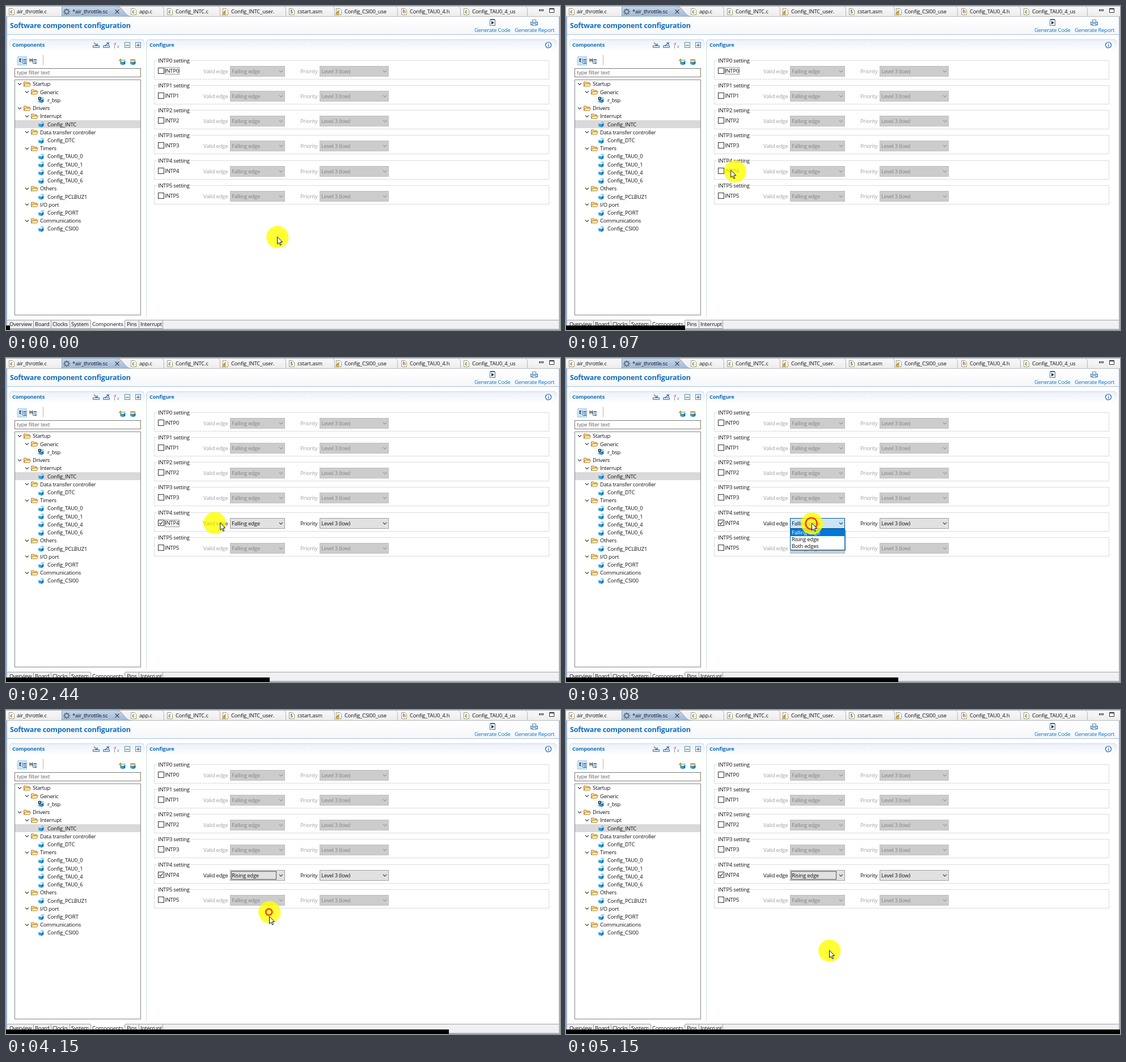
Recreate the animation shown at these times as an HTML page with a canvas. Size 977 px wide and 573 px high, loop 5200 ms.

```html
<!DOCTYPE html>
<html lang="en">
<head>
<meta charset="utf-8">
<title>Interrupt configuration</title>
<style>
html, body { margin: 0; width: 100%; height: 100%; overflow: hidden; background: #fff; }
canvas { display: block; }
</style>
</head>
<body>
<canvas id="stage" width="977" height="573"></canvas>
<script>
const ctx = document.getElementById('stage').getContext('2d');
const LOOP = 5200, FRAMES = 130;
const BLUE = '#0f6fc0', INK = '#111', FRAME = '#99b4d1';

// ---------- drawing helpers ----------
function box(x, y, w, h, fill, stroke) {
  if (fill) { ctx.fillStyle = fill; ctx.fillRect(x, y, w, h); }
  if (stroke) {
    ctx.strokeStyle = stroke;
    ctx.lineWidth = 1;
    ctx.strokeRect(x + .5, y + .5, w - 1, h - 1);
  }
}
function poly(points, fill, stroke, width = 1) {
  ctx.beginPath();
  for (let i = 0; i < points.length; i += 2) ctx.lineTo(points[i], points[i + 1]);
  if (fill) { ctx.closePath(); ctx.fillStyle = fill; ctx.fill(); }
  if (stroke) { ctx.strokeStyle = stroke; ctx.lineWidth = width; ctx.stroke(); }
}
function disc(x, y, r, fill, stroke, width = 1) {
  ctx.beginPath();
  ctx.arc(x, y, r, 0, 7);
  if (fill) { ctx.fillStyle = fill; ctx.fill(); }
  if (stroke) { ctx.strokeStyle = stroke; ctx.lineWidth = width; ctx.stroke(); }
}
// y is the vertical middle of the line of text
function text(s, x, y, color = INK, size = 9.5, weight = 400) {
  ctx.font = `${weight} ${size}px "Open Sans", "Noto Sans", sans-serif`;
  ctx.letterSpacing = '-0.22px';
  ctx.fillStyle = color;
  ctx.fillText(s, x, y + size * .36);
}
function fade(y0, y1, c0, c1) {
  const g = ctx.createLinearGradient(0, y0, 0, y1);
  g.addColorStop(0, c0);
  g.addColorStop(1, c1);
  return g;
}
const chevron = (x, y, color, r = 3) => poly([x - r, y - r / 2, x, y + r / 2, x + r, y - r / 2], null, color, 1.1);

// ---------- icons ----------
function fileIcon(x, letter, warn) {
  poly([x + .5, 4.5, x + 6.5, 4.5, x + 9.5, 7.5, x + 9.5, 15.5, x + .5, 15.5, x + .5, 4.5], '#fff', '#b59a55');
  text(letter, x + 2.5, 10.5, letter === 'h' ? '#7a4fa0' : '#2467ad', 8, 700);
  if (warn) poly([x - 1, 16, x + 2, 10, x + 5, 16], '#f3b52b', '#a9741c', .6);
}
function folder(x, y) {
  poly([x + .5, y + 4, x + .5, y - 4, x + 5, y - 4, x + 6, y - 2.5, x + 10.5, y - 2.5, x + 10.5, y], '#f5d58b', '#b78432');
  poly([x + .5, y + 4, x + 3, y - .5, x + 12.5, y - .5, x + 10.5, y + 4, x + .5, y + 4], '#fde9ae', '#b78432');
}
function cube(x, y) {
  poly([x + 3, y - 2.5, x + 7, y - 5, x + 11, y - 4, x + 7.5, y - 1.5], '#8fd0f2');
  poly([x, y - 1, x + 6, y, x + 6, y + 5.5, x + .5, y + 4], '#2f9fdd');
  poly([x + 6, y, x + 9.5, y - 2, x + 9.5, y + 3, x + 6, y + 5.5], '#1878b8');
}
function treeIcon(x, letter) {
  text(letter, x, 96, '#333', 8, 700);
  poly([x + 6.5, 93, x + 6.5, 101.5, x + 10, 101.5], null, '#4a74a5');
  box(x + 8, 94, 5, 2, '#3a78b5');
  box(x + 8, 97, 5, 2, '#d59a32');
  box(x + 9, 100, 4, 2, '#3a78b5');
}
function tray(x, out) {
  poly([x - 5.5, 70, x - 5.5, 73.5, x + 5.5, 73.5, x + 5.5, 70], '#dfeaf5', '#44719f');
  const a = out ? [x - 3, 71, x + 4, 65, x, 65, x + 4, 65, x + 4, 69] : [x - 4, 65, x + 2, 70, x + 2, 66, x + 2, 70, x - 2, 70];
  poly(a, null, '#2e6fae', 1.2);
}
function foldBox(x, plus) {
  box(x - 5, 64, 10, 10, '#f5fafe', '#5c88b4');
  box(x - 3, 69, 6, 1, '#1f5b98');
  if (plus) box(x - .5, 66, 1, 6, '#1f5b98');
}

// ---------- window parts ----------
const tabs = [
  [5, 'air_throttle.c', 'c'], [102, '*air_throttle.sc', ''], [220, 'app.c', 'c'],
  [284, 'Config_INTC.c', 'c'], [382, 'Config_INTC_user.', 'c', 1], [499, 'cstart.asm', 'S'],
  [582, 'Config_CSI00_use', 'c', 1], [697, 'Config_TAU0_4.h', 'h'], [807, 'Config_TAU0_4_us', 'c']
];
function drawTabs() {
  box(0, 0, 977, 19, fade(0, 19, '#f8f8f8', '#ededed'));
  box(0, 0, 977, 1, '#a8adb3');
  box(0, 18, 977, 1, '#b4b9c0');
  for (const x of [278, 377, 493, 579, 690, 801, 919])
    poly([x - 3, .5, x - .5, 3, x + .5, 6, x + .5, 18], null, '#b4b9c0');
  ctx.beginPath();
  ctx.moveTo(98.5, 19);
  ctx.lineTo(98.5, 3);
  ctx.quadraticCurveTo(98.5, .5, 101, .5);
  ctx.lineTo(194, .5);
  ctx.bezierCurveTo(207, .5, 208, 18, 222, 19);
  ctx.fillStyle = fade(0, 19, '#c8d7e8', '#9fb9d6');
  ctx.fill();
  ctx.strokeStyle = '#8ea5be';
  ctx.stroke();
  for (const [x, name, letter, warn] of tabs) {
    if (letter) fileIcon(x, letter, warn);
    text(name, x + (x === 5 ? 14 : 15), 10);
  }
  disc(107, 10, 3.6, null, '#68727c', 2);
  for (let i = 0; i < 8; i++) {
    const c = Math.cos(i * Math.PI / 4), s = Math.sin(i * Math.PI / 4);
    poly([107 + 4 * c, 10 + 4 * s, 107 + 6 * c, 10 + 6 * s], null, '#68727c', 1.5);
  }
  poly([192.5, 6.5, 199.5, 13.5], null, '#444', 1.2);
  poly([199.5, 6.5, 192.5, 13.5], null, '#444', 1.2);
  box(940, 6, 8, 3, '#fff', '#333');
  box(958, 4, 9, 8, '#fff', '#333');
  box(958, 4, 9, 2, '#333');
}
function drawHeader() {
  box(0, 19, 977, 32, fade(19, 51, '#fff', '#f5f7fa'));
  box(2, 50, 973, 1, '#a9c3e0');
  text('Software component configuration', 7, 34.5, BLUE, 12.6, 700);
  text('Generate Code', 826, 42.5, BLUE);
  text('Generate Report', 897, 42.5, BLUE);
  box(853, 24, 10, 11, '#f2f6fa', '#587ca0');
  box(854, 23, 8, 2, '#43698f');
  poly([856, 26.5, 861, 29.5, 856, 32.5], '#333');
  box(928, 24, 7, 5, '#fff', '#5d87b3');
  box(925, 28, 13, 6, '#bed4ea', '#4d7bab');
  box(928, 31, 7, 4, '#fff', '#5d87b3');
}
function section(x, w, title) {
  ctx.beginPath();
  ctx.moveTo(x + .5, 80);
  ctx.lineTo(x + .5, 63);
  ctx.quadraticCurveTo(x + .5, 59.5, x + 4, 59.5);
  ctx.lineTo(x + w - 4, 59.5);
  ctx.quadraticCurveTo(x + w - .5, 59.5, x + w - .5, 63);
  ctx.lineTo(x + w - .5, 80);
  ctx.fillStyle = fade(59, 80, '#eaf1f9', '#fff');
  ctx.fill();
  ctx.strokeStyle = fade(59, 80, '#c6d6e7', '#fff');
  ctx.lineWidth = 1;
  ctx.stroke();
  text(title, x + 5, 69, BLUE, 9.4, 700);
}

// depth, label
const tree = [
  [0, 'Startup'], [1, 'Generic'], [2, 'r_bsp'], [0, 'Drivers'], [1, 'Interrupt'], [2, 'Config_INTC'],
  [1, 'Data transfer controller'], [2, 'Config_DTC'], [1, 'Timers'], [2, 'Config_TAU0_0'],
  [2, 'Config_TAU0_1'], [2, 'Config_TAU0_4'], [2, 'Config_TAU0_6'], [1, 'Others'],
  [2, 'Config_PCLBUZ1'], [1, 'I/O port'], [2, 'Config_PORT'], [1, 'Communications'], [2, 'Config_CSI00']
];
function drawComponents() {
  section(6, 238, 'Components');
  tray(159, false);
  tray(177, true);
  text('a', 190, 66, '#667', 8);
  text('z', 196, 71.5, '#667', 8);
  poly([191.5, 70, 191.5, 75], null, '#889');
  foldBox(214, false);
  foldBox(233, true);

  box(20, 89, 17, 16, '#cce6fb', '#9ecbef');
  treeIcon(23, 'E');
  treeIcon(41, 'H');
  box(65, 87, 1, 17, '#b5b5b5');
  cube(201, 99);
  box(199, 95, 6, 2, '#d39a20');
  box(201, 93, 2, 6, '#d39a20');
  cube(219, 99);
  box(219, 94, 8, 3, '#dca32b');

  box(15, 110, 223, 16, '#fff', '#7a7a7a');
  text('type filter text', 19, 118, '#666');
  box(15, 130, 223, 417, '#fff', '#828790');
  box(16, 202, 221, 14, '#d9d9d9');
  tree.forEach(([depth, label], i) => {
    const y = 138 + i * 14.22, row = Math.round(y);
    if (depth < 2) {
      chevron(24 + depth * 13, row, '#444');
      folder(31 + depth * 13, row);
    } else cube(57, row);
    if (label === 'r_bsp') {
      disc(59.5, row - 2.5, 3, '#444');
      box(59, row - 4, 1, 3, '#fff');
    }
    text(label, 47 + depth * 13, y);
  });
}
function drawPageTabs() {
  box(0, 555, 977, 18, '#f0f0f0');
  box(2, 555, 973, 1, '#a0a0a0');
  box(149, 555, 61, 15, '#fff');
  for (const x of [48, 79, 112, 149, 209, 234, 276]) box(x, 556, 1, 14, '#a0a0a0');
  box(2, 570, 275, 1, '#a0a0a0');
  const names = ['Overview', 6, 'Board', 51, 'Clocks', 82, 'System', 115, 'Components', 152, 'Pins', 213, 'Interrupt', 237];
  for (let i = 0; i < names.length; i += 2) text(names[i], names[i + 1], 563);
}
function drawFrame() {
  box(0, 19, 2, 554, FRAME);
  box(975, 19, 2, 554, FRAME);
  box(0, 571, 977, 2, FRAME);
}

// ---------- settings panel ----------
function combo(x, y, w, label, look) {
  const [fill, edge, ink] = {
    off: ['#ccc', '#bfbfbf', '#838383'],
    on: ['#e1e1e1', '#a0a0a0', INK],
    hover: ['#e5f1fb', '#0078d7', INK],
    open: ['#cce4f7', '#005499', INK]
  }[look];
  box(x, y - 9, w, 19, fill, edge);
  text(label, x + 3, y + .5, ink);
  chevron(x + w - 7, y + .5, look === 'off' ? '#999' : '#444');
}
function focusRect(x, y, w, h) {
  ctx.setLineDash([1, 1]);
  box(x, y, w, h, null, '#222');
  ctx.setLineDash([]);
}
function drawSettings(t) {
  section(248, 723, 'Configure');
  box(247, 63, 1, 488, '#d3deea');
  disc(956.5, 69, 5, '#fff', '#1d5fa3', 1.2);
  box(956, 68, 1, 4, '#1d5fa3');
  box(956, 66, 1, 1, '#1d5fa3');

  const enabled = t >= 1690, opened = t >= 2870 && t < 3860, chosen = t >= 3860;
  for (let i = 0; i < 6; i++) {
    const y = Math.floor(115 + i * 44.3), name = 'INTP' + i, live = i === 4 && enabled;
    const ink = live ? INK : '#a0a0a0';
    box(261, y - 19, 697, 34, null, '#dcdcdc');
    box(266, y - 20, 60, 3, '#fff');
    text(name + ' setting', 268, y - 18);
    box(268, y - 6, 11, 11, '#fff', '#333');
    if (live) poly([270.5, y - .5, 272.5, y + 2, 276.5, y - 3], null, '#222', 1.2);
    text(name, 280, y);
    text('Valid edge', 348, y + .5, ink);
    text('Priority', 519, y + .5, ink);
    const hot = t > 2620 && t < 4000;
    const look = !live ? 'off' : opened ? 'open' : hot ? 'hover' : 'on';
    combo(395, y, 97, live && chosen ? 'Rising edge' : 'Falling edge', look);
    combo(553, y, 122, 'Level 3 (low)', live ? 'on' : 'off');
  }
  if (t < 1650) focusRect(280, 108, 26, 13);
  else if (t < 2870) focusRect(280, 286, 26, 13);
  if (chosen) box(397, 285, 80, 15, null, '#555');
  if (opened) drawList(t > 3410 ? 1 : 0);
}
function drawList(active) {
  box(397, 304, 97, 37, 'rgba(0,0,0,.3)');
  box(395, 302, 97, 38, '#fff', '#0067b8');
  box(396, 303 + active * 12, 95, 12, '#0078d7');
  ['Falling edge', 'Rising edge', 'Both edges'].forEach((s, i) =>
    text(s, 398, 308.8 + i * 12, i === active ? '#fff' : INK));
}

// ---------- motion ----------
// each move: start, end, from, to
const moveX = [[590, 1190, 479, 278], [2120, 2700, 278, 434], [3150, 3550, 434, 440], [3850, 4130, 440, 465]];
const moveY = [[590, 1110, 409, 291], [2120, 2700, 291, 293], [3150, 3550, 293, 320], [3965, 4428, 320, 426]];
function track(moves, t) {
  let v = moves[0][2];
  for (const [a, b, from, to] of moves) if (t >= a) {
    const p = Math.min(1, (t - a) / (b - a));
    v = from + (to - from) * p * p * (3 - 2 * p);
  }
  return v;
}
function drawPointer(t) {
  const x = track(moveX, t) - .3, y = track(moveY, t) - .3;
  disc(x, y, 19.6, 'rgba(255,255,0,.8)');
  for (const press of [1650, 2850, 3800]) {
    const age = t - press;
    const r = 11 * Math.min(1, age / 120, (470 - age) / 200);
    if (r > 0) disc(x - 1, y, Math.max(.5, r - 1), null, '#f8381c', 2.5);
  }
  // the arrow runs slightly ahead of its highlight
  ctx.save();
  ctx.translate(track(moveX, t + 25) - .5, track(moveY, t + 25) - 1);
  poly([0, 0, 0, 13, 3, 10.3, 5, 15, 7, 14.2, 5, 9.6, 9, 9.4, 0, 0], '#fff', '#111');
  ctx.restore();
}
// time and step at which the progress rate changes
const pace = [[0, 0], [40, 1], [600, 15], [1150, 29], [1690, 43], [2220, 56], [2750, 69],
  [3300, 82], [3830, 95], [4370, 109], [4930, 123], [5150, 129], [LOOP, 129]];
function drawProgress(t) {
  const i = pace.findIndex(([at]) => at > t);
  const [t0, n0] = pace[i - 1], [t1, n1] = pace[i];
  const step = Math.floor(n0 + (n1 - n0) * (t - t0) / (t1 - t0) + .3);
  box(0, 565, Math.floor((Math.min(step, FRAMES - 1) + 1) * 977 / FRAMES), 8, '#000');
}

function draw() {
  const t = performance.now() % LOOP;
  box(0, 0, 977, 573, '#fff');
  drawTabs();
  drawHeader();
  drawComponents();
  drawSettings(t);
  drawPageTabs();
  drawFrame();
  drawPointer(t);
  drawProgress(t);
  requestAnimationFrame(draw);
}
draw();
</script>
</body>
</html>
```
